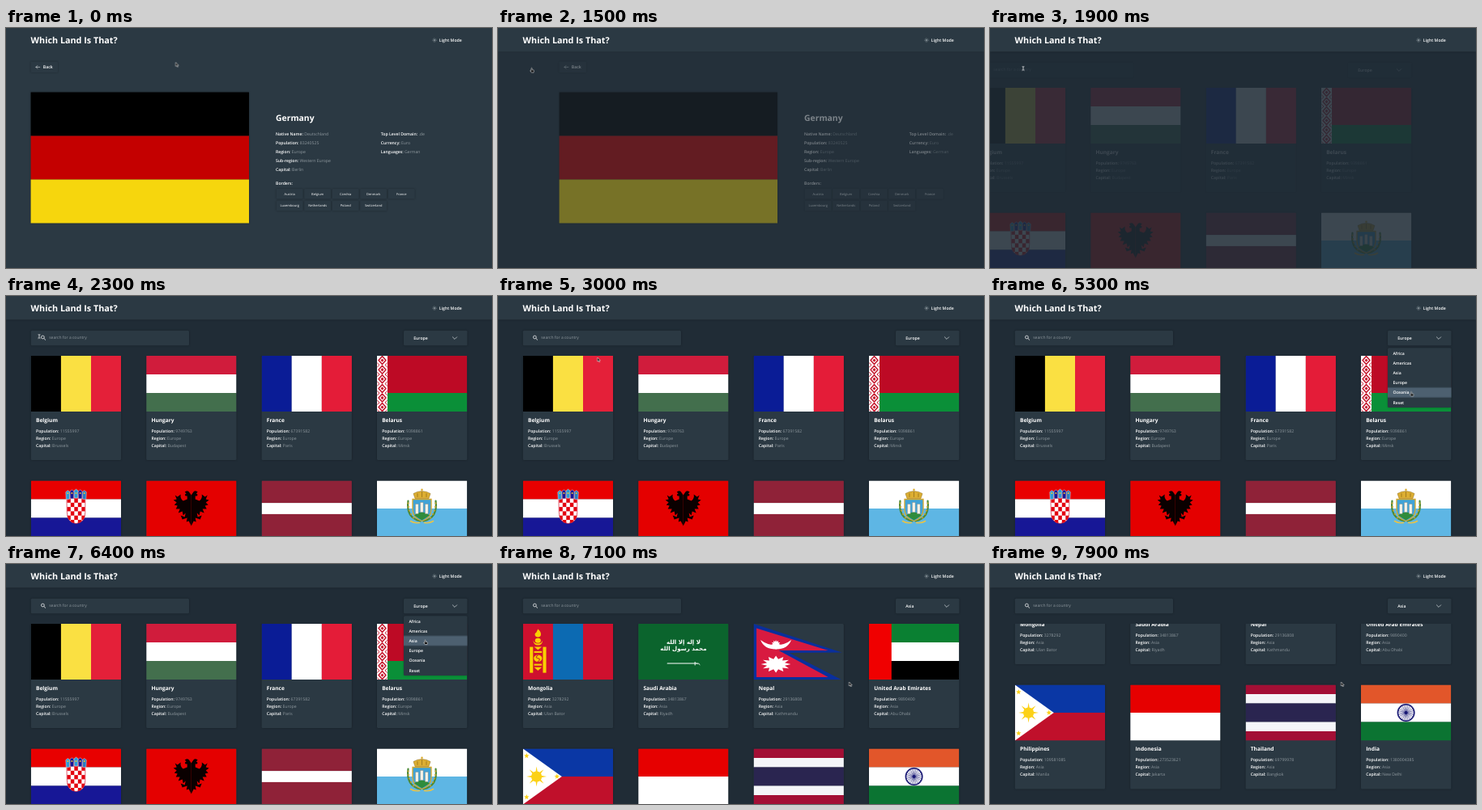
These frames come from a looping animation (600 by 297 pixels, 8 s). An HTML page:

```html
<!DOCTYPE html>
<html lang="en">
<head>
<meta charset="utf-8">
<title>Country browser</title>
<style>
html, body { margin: 0; width: 100%; height: 100%; overflow: hidden; background: #202c36; }
#stage { display: block; width: 100vw; height: 100vh; }
text { font-family: "Open Sans", "Noto Sans", sans-serif; font-size: 5.15px; fill: #fff; text-rendering: geometricPrecision; }
.bold { font-weight: 700; }
.semi { font-weight: 600; }
.soft { font-weight: 400; fill: #8f999f; }
.mid { text-anchor: middle; }
.lift { filter: drop-shadow(0 .6px 1.2px rgba(0, 0, 0, .3)); }

/* 1% is 80 ms; motion advances in 100 ms steps */
.anim { animation: 8s -10ms infinite; }
.cut { animation-timing-function: step-end; }
#veil { animation-name: fade; }
#detail { animation-name: leave; }
#list { animation-name: enter; }
.before { animation-name: before; }
.after { animation-name: after; }
#menu { animation-name: menu; }
#hover { animation-name: hover; }
#rows { animation-name: scroll; }
#pointer { animation-name: move; }
#arrow { animation-name: arrow; }
#hand { animation-name: hand; }
#beam { animation-name: beam; }

@keyframes fade {
  0%, 15% { opacity: 1; animation-timing-function: steps(5); }
  21.25%, 100% { opacity: 0; }
}
@keyframes leave {
  0%, 15% { opacity: 1; transform: none; animation-timing-function: steps(5); }
  21.25%, 100% { opacity: 0; transform: translateX(75px); }
}
@keyframes enter {
  0%, 22.5% { opacity: 0; transform: translateX(-58px); animation-timing-function: step-end; }
  23.75% { opacity: .13; transform: translateX(-49px); animation-timing-function: steps(2); }
  26.25% { opacity: .65; transform: translateX(-19px); animation-timing-function: steps(2); }
  28.75%, 100% { opacity: 1; transform: none; }
}
@keyframes before { 0% { opacity: 1; } 85%, 100% { opacity: 0; } }
@keyframes after { 0% { opacity: 0; } 85%, 100% { opacity: 1; } }
@keyframes menu { 0% { opacity: 0; } 52.5% { opacity: 1; } 85%, 100% { opacity: 0; } }
@keyframes hover {
  0% { opacity: 0; transform: none; }
  56.25% { opacity: 1; transform: none; }
  58.75% { opacity: 1; transform: translateY(12.2px); }
  61.25% { opacity: 1; transform: translateY(24.4px); }
  63.75% { opacity: 1; transform: translateY(36.6px); }
  66.25% { opacity: 1; transform: translateY(48.8px); }
  75% { opacity: 1; transform: translateY(36.6px); }
  77.5%, 100% { opacity: 1; transform: translateY(24.4px); }
}
@keyframes scroll {
  0%, 95% { transform: none; animation-timing-function: steps(3); }
  98.75%, 100% { transform: translateY(-79px); }
}
@keyframes move {
  0% { transform: translate(209.5px, 42.5px); animation-timing-function: step-end; }
  1.25%, 2.5% { transform: translate(150px, 45px); animation-timing-function: steps(2); }
  5%, 7.5% { transform: translate(58px, 48px); animation-timing-function: steps(3); }
  11.25%, 33.75% { transform: translate(41px, 49.5px); animation-timing-function: steps(4); }
  38.75%, 40% { transform: translate(150px, 85px); animation-timing-function: steps(6); }
  47.5%, 52.5% { transform: translate(526px, 51px); animation-timing-function: steps(7); }
  61.25%, 62.5% { transform: translate(519px, 95px); animation-timing-function: steps(3); }
  66.25%, 71.25% { transform: translate(519.5px, 118.5px); animation-timing-function: steps(6); }
  78.75%, 83.75% { transform: translate(517px, 94px); animation-timing-function: steps(4); }
  88.75%, 100% { transform: translate(433.5px, 146px); }
}
@keyframes arrow { 0% { opacity: 1; } 5% { opacity: 0; } 36.25% { opacity: 1; } 56.25% { opacity: 0; } 85%, 100% { opacity: 1; } }
@keyframes hand { 0% { opacity: 0; } 5% { opacity: 1; } 20% { opacity: 0; } 56.25% { opacity: 1; } 85%, 100% { opacity: 0; } }
@keyframes beam { 0% { opacity: 0; } 20% { opacity: 1; } 36.25%, 100% { opacity: 0; } }
</style>
</head>
<body>
<svg id="stage" viewBox="0 0 600 297" preserveAspectRatio="none"></svg>
<script>
const PANEL = '#2b3943', W = 111.3, H = 69;

const rect = (x, y, w, h, fill, extra = '') =>
  `<rect x="${x}" y="${y}" width="${w}" height="${h}" fill="${fill}" ${extra}/>`;
const path = (d, fill, extra = '') => `<path d="${d}" fill="${fill}" ${extra}/>`;
const line = (d, color, width) => path(d, 'none', `stroke="${color}" stroke-width="${width}" stroke-linecap="round" stroke-linejoin="round"`);
const dot = (x, y, r, fill, extra = '') => `<circle cx="${x}" cy="${y}" r="${r}" fill="${fill}" ${extra}/>`;
const text = (x, y, s, cls = 'semi', size = 5.15) =>
  `<text x="${x}" y="${y}" class="${cls}" style="font-size:${size}px">${s}</text>`;
const fact = (x, y, label, value) =>
  `<text x="${x}" y="${y}"><tspan class="semi">${label}:</tspan><tspan class="soft"> ${value}</tspan></text>`;
const times = (n, f) => Array.from({ length: n }, (_, i) => f(i)).join('');
const mirror = (x, y, art) =>
  `<g transform="translate(${x} ${y})">${art}<g transform="scale(-1 1)">${art}</g></g>`;

// Stripes take [colour, share] pairs
function stripes(parts, down) {
  const total = parts.reduce((sum, p) => sum + p[1], 0);
  let at = 0;
  return parts.map(([color, share]) => {
    const from = at / total;
    const part = share / total;
    at += share;
    return down ? rect(0, from * H, W, part * H + .1, color)
                : rect(from * W, 0, part * W + .1, H, color);
  }).join('');
}
const across = (...colors) => stripes(colors.map(c => [c, 1]), false);
const down = (...colors) => stripes(colors.map(c => [c, 1]), true);

function star(cx, cy, n, outer, inner, fill) {
  const points = Array.from({ length: n * 2 }, (_, i) => {
    const a = Math.PI * i / n - Math.PI / 2, r = i % 2 ? inner : outer;
    return (cx + r * Math.cos(a)).toFixed(2) + ',' + (cy + r * Math.sin(a)).toFixed(2);
  });
  return `<polygon points="${points.join(' ')}" fill="${fill}"/>`;
}

const ornament = () => rect(0, 0, 13, H, '#fff') + times(6, i => {
  const y = i * 11.6 + 5.6;
  return line(`M6.5 ${y - 5}L11 ${y}L6.5 ${y + 5}L2 ${y}Z`, '#c4162c', 1.5)
    + path(`M6.5 ${y - 2.2}l2 2.2l-2 2.2l-2-2.2Z`, '#c4162c')
    + line(`M.6 ${y + 3.5}l2.5 2.3l-2.5 2.3M12.4 ${y + 3.5}l-2.5 2.3l2.5 2.3`, '#c4162c', 1);
});

const checkers = () => {
  const shield = 'M44.5 22H67V39Q67 52 55.7 53Q44.5 52 44.5 39Z';
  const cells = times(30, i => {
    const c = i % 5, r = Math.floor(i / 5);
    return (c + r) % 2 ? '' : rect(44.5 + c * 4.5, 22 + r * 5.3, 4.5, 5.3, '#e3000f');
  });
  const crown = times(5, i => path(
    `M${43 + i * 5.1} ${12.5 + Math.abs(i - 2) * .8}l2.5-2l2.6 2l-.5 9h-4.2Z`,
    ['#2b9bd6', '#171796', '#2b9bd6', '#171796', '#2b7cc0'][i], 'stroke="#fff" stroke-width=".4"')
    + dot(45.5 + i * 5.1, 15.5, 1, '#f2c230'));
  return path(shield, '#fff') + `<clipPath id="shield"><path d="${shield}"/></clipPath>`
    + `<g clip-path="url(#shield)">${cells}</g>` + line(shield, '#d5152b', .7) + crown;
};

const eagle = mirror(55.5, 0, path('M0 18L2 15Q4 11 8 14L6 16Q9 17 7 19L5 19L5 23L10 25Q14 22 13 17'
  + 'L17 20L20 18L18 23L22 24L18 27L21 30L17 31L19 35L14 35L16 40L11 38L10 43L7 40L8 45L13 43'
  + 'L11 48L5 46L6 51L3 50L0 56Z', '#0a0000'));

const towers = () =>
  mirror(55.5, 0, line('M2 50Q20 46 17 25', '#4d8a35', 2.2) + line('M3 52Q10 53 14 50', '#e6c34a', 1.6)
    + times(5, i => dot(17 - i * i * .4, 28 + i * 4.5, 1.1, '#c9a132')))
  + path('M44 23H67V36Q66 47 55.5 50Q45 47 44 36Z', '#3fa3d8', 'stroke="#d9aa2b" stroke-width="1.3"')
  + path('M46 43Q55 35 65 43L55.5 49Z', '#2f8c3c')
  + times(3, i => rect(47.5 + i * 6, 29 - (i === 1 ? 2 : 0), 3.6, 12, '#f5f2e6', 'stroke="#8b8a80" stroke-width=".4"'))
  + path('M47 22L45 16Q50 13 55.5 13Q61 13 66 16L64 22Z', '#dcae32', 'stroke="#8a6819" stroke-width=".5"')
  + line('M50 20V16M55.5 20V14M61 20V16', '#8a6819', .7) + dot(55.5, 11.3, 1.3, '#dcae32');

const soyombo = () => {
  const y = '#f9cf02';
  return `<g transform="translate(-4.8 -.8) scale(1.28 1.05)">`
    + path('M18.2 7Q22 11 20.8 15Q18.2 18 15.6 15Q14.6 12 16.6 11Z', y)
    + dot(18.2, 20.5, 2.8, y) + path('M13.6 20Q14 26 18.2 26Q22.4 26 22.8 20Q22 24 18.2 24Q14.4 24 13.6 20Z', y)
    + rect(10.3, 28, 3.2, 30.5, y) + rect(23, 28, 3.2, 30.5, y)
    + path('M14.5 28H22L18.2 31.5Z', y) + rect(14.5, 33, 7.5, 2, y)
    + dot(18.2, 41.5, 4, y) + line('M18.2 37.8Q14.8 40.5 18.2 41.5T18.2 45.2', '#c4272f', .8)
    + rect(14.5, 48, 7.5, 2, y) + path('M14.5 52H22L18.2 56Z', y) + '</g>';
};

const script = `<g style="direction:rtl">${['لا إله إلا الله', 'محمد رسول الله'].map((s, i) =>
    `<text x="55.8" y="${25 + i * 8}" class="mid" style="font:700 7.1px 'DejaVu Sans',sans-serif">${s}</text>`).join('')}</g>`
  + line('M36 49H72', '#fff', 1.1) + line('M70 47.5V51M72 49Q75 48.5 76 50.5', '#fff', 1);

const nepal = path('M0 0L109 35.5L44 36L108 69H0Z', '#0a2f9c')
  + path('M3.5 5.5L92 33H31L92 66H3.5Z', '#d81a40')
  + path('M8.5 20Q13 31.5 27.5 31.5Q42 31.5 46.5 20Q38 26.5 27.5 26.5Q17 26.5 8.5 20Z', '#fff')
  + star(27.5, 26, 12, 6, 3.8, '#fff')
  + `<g transform="translate(27.5 50) scale(1.42 .8)">${star(0, 0, 12, 13, 8, '#fff')}</g>`;

const philippines = down('#0a37a5', '#c0102b') + path(`M0 0L48 ${H / 2}L0 ${H}Z`, '#fff')
  + star(16.8, 34.5, 8, 12.5, 4, '#fcd116') + dot(16.8, 34.5, 6.6, '#fcd116')
  + star(4.5, 9, 5, 3.4, 1.4, '#fcd116') + star(4.5, 60, 5, 3.4, 1.4, '#fcd116') + star(42, 34.5, 5, 3.4, 1.4, '#fcd116');

const wheel = dot(55.6, 34.5, 10.2, 'none', 'stroke="#1a1a75" stroke-width="1.6"') + dot(55.6, 34.5, 2, '#1a1a75')
  + times(24, i => `<path d="M55.6 34.5v-10" stroke="#1a1a75" stroke-width=".5" transform="rotate(${i * 15} 55.6 34.5)"/>`);

const europe = [
  ['Belgium', 11555997, 'Brussels', across('#000', '#fae042', '#e42039')],
  ['Hungary', 9749763, 'Budapest', down('#d01c3c', '#fff', '#436f4d')],
  ['France', 67391582, 'Paris', across('#0a1c96', '#fff', '#e41c38')],
  ['Belarus', 9398861, 'Minsk', stripes([['#bd0a25', 2], ['#0a8f38', 1]], true) + ornament()],
  ['Croatia', 4047200, 'Zagreb', down('#e80000', '#fff', '#171796') + checkers()],
  ['Albania', 2837743, 'Tirana', rect(0, 0, W, H, '#e40000') + eagle],
  ['Latvia', 1901548, 'Riga', stripes([['#8f2238', 2], ['#fff', 1], ['#8f2238', 2]], true)],
  ['San Marino', 33938, 'San Marino', down('#fff', '#5eb6e4') + towers()]
];
const asia = [
  ['Mongolia', 3278292, 'Ulan Bator', across('#cf102e', '#0c6ab2', '#cf102e') + soyombo()],
  ['Saudi Arabia', 34813867, 'Riyadh', rect(0, 0, W, H, '#0b642d') + script],
  ['Nepal', 29136808, 'Kathmandu', nepal],
  ['United Arab Emirates', 9890400, 'Abu Dhabi', down('#0a8032', '#fff', '#000') + rect(0, 0, 27.8, H, '#f00000')],
  ['Philippines', 109581085, 'Manila', philippines],
  ['Indonesia', 273523621, 'Jakarta', down('#e60000', '#fff')],
  ['Thailand', 69799978, 'Bangkok', stripes([['#a30f35', 1], ['#f4f5f8', 1], ['#2a2550', 2], ['#f4f5f8', 1], ['#a30f35', 1]], true)],
  ['India', 1380004385, 'New Delhi', down('#e2562a', '#fff', '#0b7432') + wheel]
];

const cards = (list, region) => list.map(([name, people, capital, flag], i) => {
  const x = 30.8 + (i % 4) * 142.4, y = 74 + Math.floor(i / 4) * 154.5;
  return rect(x, y, W, 129, PANEL, 'rx="1.5" class="lift"')
    + `<svg x="${x}" y="${y}" width="${W}" height="${H}">${flag}</svg>`
    + text(x + 6.2, y + 81.5, name, 'bold', 6.6)
    + fact(x + 6.2, y + 94.6, 'Population', people)
    + fact(x + 6.2, y + 103.6, 'Region', region)
    + fact(x + 6.2, y + 112.6, 'Capital', capital);
}).join('');

const borders = ['Austria', 'Belgium', 'Czechia', 'Denmark', 'France', 'Luxembourg', 'Netherlands', 'Poland', 'Switzerland'];
const left = [['Native Name', 'Deutschland'], ['Population', '83240525'], ['Region', 'Europe'], ['Sub-region', 'Western Europe'], ['Capital', 'Berlin']];
const right = [['Top Level Domain', '.de'], ['Currency', 'Euro'], ['Languages', 'German']];
const facts = (list, x) => list.map(([k, v], i) => fact(x, 133 + i * 11, k, v)).join('');

const detail = `<g id="detail" class="anim">
  ${rect(30.5, 41.5, 33.5, 13.5, PANEL, 'rx="1" class="lift"')}
  ${line('M41.8 48.4H37M38.8 46.6L37 48.4L38.8 50.2', '#e4e8ea', .6)}
  ${text(45.8, 50.3, 'Back')}
  <g class="lift">${['#000', '#c40000', '#f6d60d'].map((c, i) => rect(30.6, 79.5 + i * 54, 269.4, 54, c)).join('')}</g>
  ${text(333, 115.3, 'Germany', 'bold', 10.4)}
  ${facts(left, 333)}${facts(right, 462.8)}
  ${text(333, 194.2, 'Borders:')}
  ${borders.map((name, i) => {
    const x = 350.2 + (i % 5) * 34.5, y = 205.2 + Math.floor(i / 5) * 14.8;
    return rect(x - 16.4, y - 6.2, 32.8, 12.4, PANEL, 'rx="1" class="lift"') + text(x, y + 1.4, name, 'mid', 4);
  }).join('')}
</g>`;

const options = ['Africa', 'Americas', 'Asia', 'Europe', 'Oceania', 'Reset'];
const list = `<g id="list" class="anim">
  <clipPath id="view"><rect y="74" width="700" height="223"/></clipPath>
  <g clip-path="url(#view)"><g id="rows" class="anim">
    <g class="anim cut before">${cards(europe, 'Europe')}</g>
    <g class="anim cut after">${cards(asia, 'Asia')}</g>
  </g></g>
  ${rect(30.8, 42.8, 195.2, 18.4, PANEL, 'rx="1.5" class="lift"')}
  ${dot(45.4, 51, 1.9, 'none', 'stroke="#fff" stroke-width=".7"')}${line('M46.9 52.5L48.7 54.3', '#fff', .8)}
  ${text(53.2, 53.4, 'search for a country', 'soft', 5)}
  ${rect(491, 42.8, 78.5, 18.4, PANEL, 'rx="1.5" class="lift"')}
  <g class="anim cut before">${text(503.2, 53.9, 'Europe')}</g>
  <g class="anim cut after">${text(503.2, 53.9, 'Asia')}</g>
  ${line('M551.4 50.8L554 53.4L556.6 50.8', '#dfe4e7', .7)}
  <g id="menu" class="anim cut">
    ${rect(491, 64.3, 78.5, 73.6, PANEL, 'rx="1.5" class="lift"')}
    ${rect(491, 64.5, 78.5, 12.2, '#4d6070', 'id="hover" class="anim cut"')}
    ${options.map((s, i) => text(497.4, 72.5 + i * 12.2, s)).join('')}
  </g>
</g>`;

const header = `<g class="lift">${rect(0, 0, 600, 29.3, PANEL)}</g>
  ${text(30.6, 18.7, 'Which Land Is That?', 'bold', 10.8)}
  ${dot(529, 15, 1.5, '#77828a')}${dot(529, 15, 2.3, 'none', 'stroke="#77828a" stroke-width=".8" stroke-dasharray=".9 .9"')}
  ${text(534.8, 17, 'Light Mode', 'semi', 5.2)}`;

const pointer = `<g id="pointer" class="anim">
  <g id="arrow" class="anim cut">${path('M0 0V5L1.2 4L2 5.8L2.9 5.4L2.1 3.7H3.6Z', '#111', 'stroke="#fff" stroke-width=".5"')}</g>
  <g id="hand" class="anim cut">${path('M0 .4Q.6-.3 1.1 .4V2.2L3.2 2.7Q3.6 2.9 3.5 3.6L3 5.6H.4L-1.4 3.4Q-1.2 2.7 0 3.4Z', '#111', 'stroke="#fff" stroke-width=".5"')}</g>
  <g id="beam" class="anim cut">${line('M-1.2-2.2Q0-2.2 0-1.5Q0-2.2 1.2-2.2M0-1.5V2M-1.2 2.7Q0 2.7 0 2Q0 2.7 1.2 2.7', '#fff', .7)}</g>
</g>`;

document.getElementById('stage').innerHTML = rect(0, 0, 600, 297, '#202c36') + header
  + rect(0, 29, 600, 268, PANEL, 'id="veil" class="anim"') + detail + list + pointer;
</script>
</body>
</html>
```
